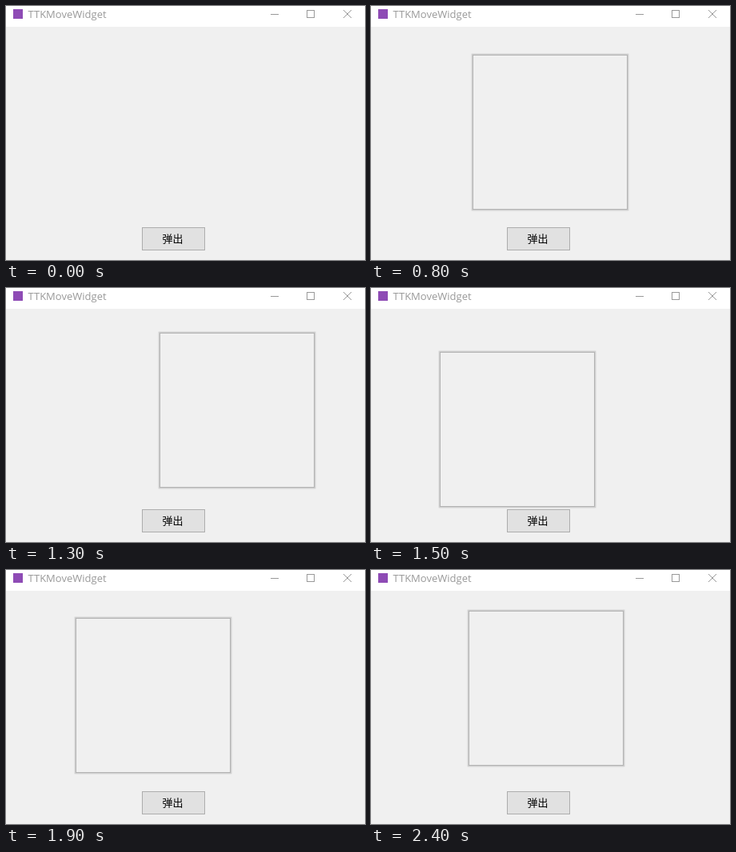
Animation, 449 px wide and 318 px high, one loop 3000 ms. Source, as an HTML page:

```html
<!DOCTYPE html>
<html lang="zh">
<head>
<meta charset="utf-8">
<title>TTKMoveWidget</title>
<style>
  html, body { margin: 0; width: 100%; height: 100%; overflow: hidden; background: #f0f0f0; }
  svg { display: block; }
  #bar { fill: #fff; color: #999; }
  #bar.active { fill: #0099bc; color: #fff; }
  #bar .caption { fill: currentColor; font: 13px "Open Sans", "Noto Sans", sans-serif; }
  #bar .controls { fill: none; stroke: currentColor; }
  #button { fill: #e1e1e1; stroke: #adadad; }
  #button.hover { fill: #dce8f2; stroke: #3c87c4; }
  #button.pressed { fill: #cce4f7; stroke: #005499; }
  #button text { fill: #000; stroke: none; font: 13px "Noto Sans CJK SC", "Noto Sans CJK", sans-serif; }
  #popup rect { fill: none; }
</style>
</head>
<body>
<svg width="449" height="318" viewBox="0 0 449 318">
  <rect width="449" height="318" fill="#f0f0f0"/>
  <g id="bar">
    <rect width="449" height="26"/>
    <rect x="9" y="4" width="12" height="12" fill="#8e4bb5"/>
    <text class="caption" x="27.5" y="15">TTKMoveWidget</text>
    <g class="controls">
      <path d="M331 10.5H341M376.5 5.5h9v9h-9z" shape-rendering="crispEdges"/>
      <path d="M422 5l10 10M432 5l-10 10"/>
    </g>
  </g>
  <g id="button">
    <rect x="170.5" y="277.5" width="78" height="28"/>
    <text x="208.5" y="296" text-anchor="middle">弹出</text>
  </g>
  <g id="popup">
    <rect width="194" height="194" style="fill:#f0f0f0"/>
    <rect x="-1.5" y="-1.5" width="197" height="197" rx="1" stroke="#e2e2e2"/>
    <rect x="-.5" y="-.5" width="195" height="195" stroke="#d0d0d0"/>
    <rect x=".5" y=".5" width="193" height="193" stroke="#b3b3b3"/>
  </g>
</svg>
<script>
const LOOP = 3000, STEP = 100;
const ACTIVE = 400, HOVER = 500, PRESS = 600, OPEN = 700;

// Popup corner at each step after it opens: at rest, then dragged in loops.
const path = [
  [127, 61], [127, 61], [127, 61], [118, 50], [93, 44], [146, 31],
  [192, 56], [140, 90], [86, 80], [118, 56], [190, 64], [136, 84],
  [87, 60], [150, 57], [146, 66], [84, 69], [104, 54], [122, 51]
];

const [bar, button, popup] = ["bar", "button", "popup"].map(id => document.getElementById(id));

function render(time) {
  const open = time >= OPEN;
  bar.setAttribute("class", time >= ACTIVE && !open ? "active" : "");
  button.setAttribute("class", open || time < HOVER ? "" : time < PRESS ? "hover" : "pressed");
  popup.style.display = open ? "" : "none";
  if (open) {
    const index = Math.min(Math.floor((time - OPEN) / STEP), path.length - 1);
    popup.setAttribute("transform", `translate(${path[index]})`);
  }
}

const start = performance.now();
function tick() {
  render((performance.now() - start) % LOOP);
  requestAnimationFrame(tick);
}
tick();
</script>
</body>
</html>
```
